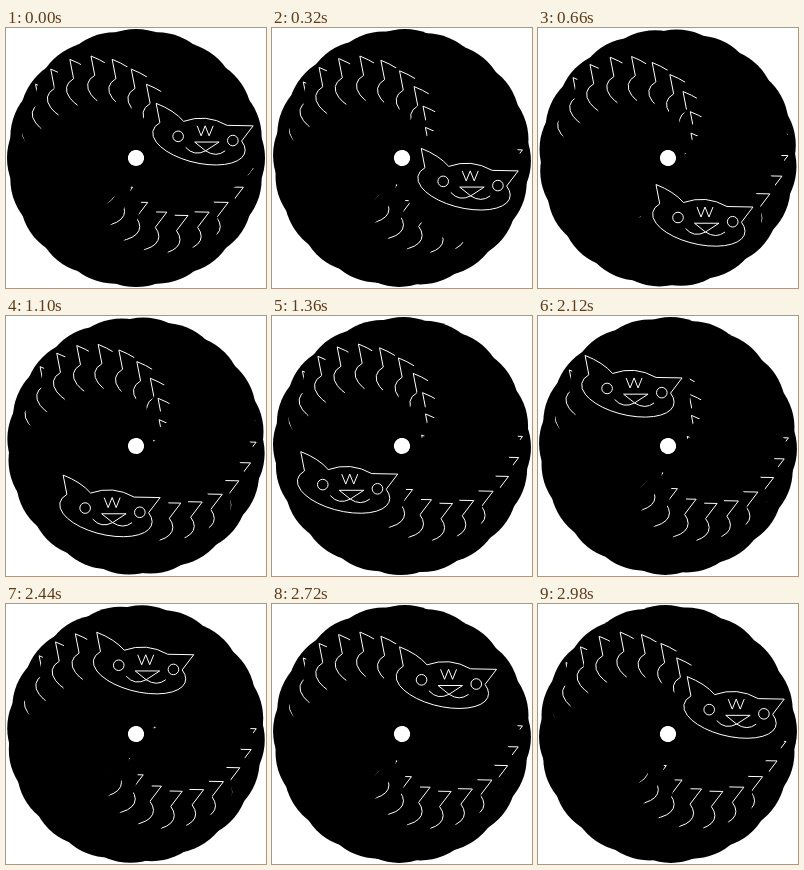
An HTML page with a canvas that plays this animation: 260x260 px, repeating every 3 s.

```html
<!DOCTYPE html>
<html lang="en">
<head>
<meta charset="utf-8">
<title>Ring of cats</title>
<style>
  html, body { margin: 0; width: 100%; height: 100%; overflow: hidden; background: #fff; }
  canvas { display: block; width: 100vw; height: 100vh; }
</style>
</head>
<body>
<canvas id="stage" width="260" height="260"></canvas>
<script>
const SIZE = 260, MID = SIZE / 2, TURN = Math.PI * 2;
const LOOP = 3000, STEP = 20;
const COUNT = 20, ORBIT = 68.5, DISC = 60.5;
const START = -TURN / COUNT;

const ctx = document.getElementById('stage').getContext('2d');
const cat = makeCat();

// The cat is drawn around the centre of its own black disc.
function makeCat() {
  const p = new Path2D();
  const eye = (x, y, r = 5.3) => {
    p.moveTo(x + r, y);
    p.arc(x, y, r, 0, TURN);
  };

  // Cheeks and chin: the lower part of a tilted ellipse, then ears and crown.
  p.ellipse(-2.2, 4.7, 47.2, 21.4, 0.23, -0.5, 3.6);
  p.lineTo(-45, -33.5);
  p.quadraticCurveTo(-27, -26.5, -17.5, -15.5);
  p.quadraticCurveTo(5, -23.5, 26, -11.5);
  p.lineTo(52, -11);
  p.closePath();

  eye(-23, -0.5);
  eye(31.7, 3.7);

  // Forehead stripes: a zigzag.
  p.moveTo(-4, -11);
  for (let i = 1; i < 5; i++) p.lineTo(-4 + i * 4, i % 2 ? -1 : -11);

  // Nose, with a smile on each side.
  p.moveTo(4.5, 14);
  p.lineTo(-6.5, 5.2);
  p.lineTo(18, 5.2);
  p.lineTo(4.5, 14);
  p.quadraticCurveTo(-7, 20, -15.5, 10.5);
  p.moveTo(4.5, 14);
  p.quadraticCurveTo(15, 21, 24, 14);
  return p;
}

function drawHead(angle) {
  ctx.save();
  ctx.translate(MID + ORBIT * Math.cos(angle), MID + ORBIT * Math.sin(angle));
  ctx.beginPath();
  ctx.arc(0, 0, DISC, 0, TURN);
  ctx.fill();
  ctx.stroke(cat);
  ctx.restore();
}

function draw(time) {
  const tick = Math.floor((time % LOOP) / STEP);
  const lead = START + tick * STEP / LOOP * TURN;
  ctx.fillStyle = '#fff';
  ctx.fillRect(0, 0, SIZE, SIZE);
  ctx.fillStyle = '#000';
  ctx.strokeStyle = '#fff';
  ctx.lineWidth = 1;
  // Each head covers the one behind it; the leader comes last.
  for (let i = 1; i <= COUNT; i++) drawHead(lead + i / COUNT * TURN);
}

const begin = performance.now();
function loop() {
  draw(performance.now() - begin);
  requestAnimationFrame(loop);
}
loop();
</script>
</body>
</html>
```
